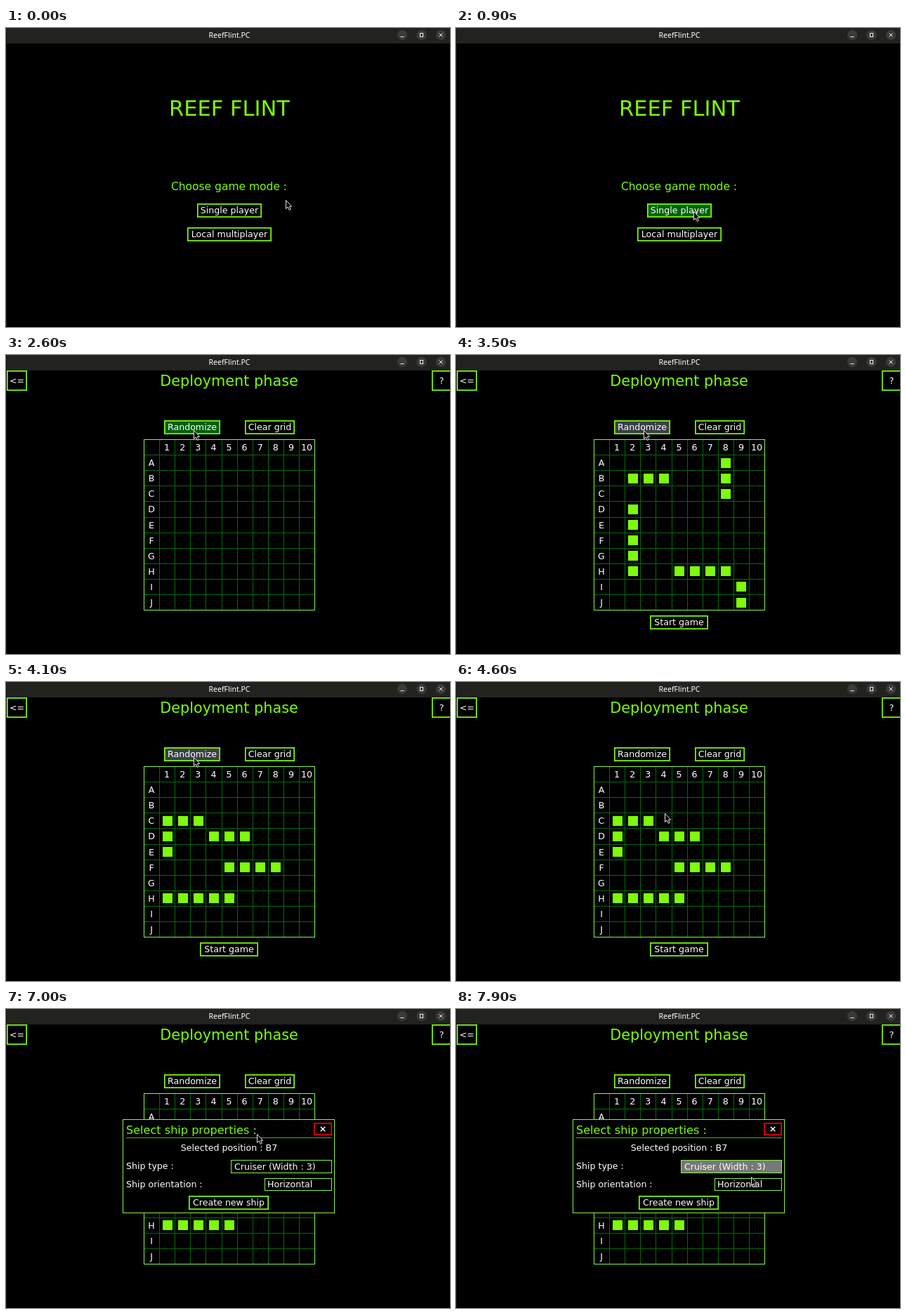
An HTML page with a canvas for the animation above (8 s loop, 632x426 px).

```html
<!DOCTYPE html>
<html lang="en">
<head>
<meta charset="utf-8">
<title>Reef Flint</title>
<style>
  html, body { margin: 0; width: 632px; height: 426px; overflow: hidden; background: #000; }
  canvas { display: block; }
</style>
</head>
<body>
<canvas id="stage" width="632" height="426"></canvas>
<script>
const g = document.getElementById('stage').getContext('2d');
const LOOP = 8000, STEP = 100, MID = 317.5;
const LIME = '#7cfc0a', EDGE = '#86f545', DARK = '#006c08';
const HOVER = '#3b4046', PRESS = '#00610a';
const GRID = { x: 196.5, y: 120.5, cell: 22.1 };

// pointer moves: start, end, x, y
const moves = [
  [0, 100, 372, 242], [300, 500, 339, 261], [1000, 1100, 339, 277], [1300, 1600, 272, 110],
  [2300, 2400, 268, 107], [4200, 4600, 298, 187], [4600, 5000, 381, 203], [5000, 5400, 359, 180],
  [5700, 6100, 342, 224], [6200, 6500, 358, 178], [7400, 7900, 421, 239]
];

// ships: row, column, direction (h or v), length
const fleets = ['A8v3 B2h3 D2v5 H5h4 I9v2', 'C1h3 D1v2 D4h3 F5h4 H1h5'];

function text(s, x, y, { size = 12.6, color = '#fff', align = 'center', font = '"DejaVu Sans", sans-serif', weight = 400 } = {}) {
  g.font = `${weight} ${size}px ${font}`;
  g.textAlign = align;
  g.fillStyle = color;
  g.fillText(s, x, y);
}

function box(x, y, w, h, { line = LIME, width = 1.7, fill = '#000' } = {}) {
  g.fillStyle = fill;
  g.fillRect(x, y, w, h);
  g.strokeStyle = line;
  g.lineWidth = width;
  g.strokeRect(x + width / 2, y + width / 2, w - width, h - width);
}

function button(label, cx, y, w, fill) {
  box(cx - w / 2, y, w, 20, { fill });
  text(label, cx, y + 14);
}

function line(x1, y1, x2, y2, color) {
  g.strokeStyle = color;
  g.lineWidth = 1;
  g.beginPath();
  g.moveTo(x1, y1);
  g.lineTo(x2, y2);
  g.stroke();
}

function windowFrame() {
  g.fillStyle = '#000';
  g.fillRect(0, 0, 632, 426);
  g.fillStyle = '#191919';
  g.fillRect(0, 0, 1, 426);
  g.fillStyle = '#22221f';
  g.fillRect(1, 0, 631, 22);
  text('ReefFlint.PC', 318, 13.5, { size: 10.5, font: '"Noto Sans", sans-serif' });
  for (let i = 0; i < 3; i++) {
    g.fillStyle = '#3a3a37';
    g.beginPath();
    g.arc(564 + i * 27.5, 10, 7.2, 0, 7);
    g.fill();
  }
  line(561.5, 12.5, 566.5, 12.5, '#eee');
  g.strokeRect(589.5, 7.5, 4, 5);
  line(616.5, 7.5, 621.5, 12.5, '#eee');
  line(621.5, 7.5, 616.5, 12.5, '#eee');
}

function menu(t) {
  text('REEF FLINT', 318, 125, { size: 30.5, color: LIME });
  text('Choose game mode :', MID, 231, { size: 15.5, color: LIME });
  button('Single player', 318, 250, 92, t >= 700 ? PRESS : t >= 400 ? HOVER : '#000');
  button('Local multiplayer', 318, 284, 120);
}

function board(fleet) {
  const { x, y, cell } = GRID, size = cell * 11;
  for (let i = 1; i < 11; i++) {
    const d = Math.floor(i * cell + 0.5);
    line(x + d, y, x + d, y + size, DARK);
    line(x, y + d, x + size, y + d, DARK);
    text(i, 207 + i * cell, 136);
    text('ABCDEFGHIJ'[i - 1], 207, 136 + i * cell);
  }
  g.strokeStyle = EDGE;
  g.strokeRect(x, y, 243, 243);
  g.fillStyle = LIME;
  for (const [row, col, dir, length] of fleet ? fleet.split(' ') : []) {
    for (let i = 0; i < length; i++) {
      const c = +col + (dir === 'h' ? i : 0);
      const r = row.charCodeAt(0) - 64 + (dir === 'v' ? i : 0);
      g.fillRect(Math.floor(x + 4.5 + c * cell), Math.floor(y + 4.5 + r * cell), 14, 14);
    }
  }
}

function deployment(t) {
  const within = (a, b) => t >= a && t < b;
  const pressed = within(2600, 2900) || within(3800, 4100);
  const fleet = t < 2900 ? '' : fleets[t < 4100 ? 0 : 1];
  box(1, 22, 29, 29);
  text('<=', 15.5, 41);
  box(606, 22, 29, 29);
  text('?', 620, 41);
  text('Deployment phase', MID, 44, { size: 20.8, color: LIME });
  button('Randomize', 265, 93, 80, pressed ? PRESS : within(1600, 4300) ? HOVER : '#000');
  button('Clear grid', 375.5, 93, 71);
  board(fleet);
  if (t >= 6700) dialog(t);
  else if (fleet) button('Start game', MID, 371, 83);
}

function dialog(t) {
  const left = { align: 'left' }, thin = { line: EDGE, width: 1 };
  box(166, 157, 302, 134, thin);
  text('Select ship properties :', 171, 178, { size: 16.1, color: LIME, align: 'left' });
  line(171, 183.5, 464, 183.5, '#5e9a4c');
  box(438, 162, 26, 18, { line: '#f00008' });
  text('×', 451, 175, { weight: 700 });
  text('Selected position : B7', MID, 202);
  text('Ship type :', 171, 228, left);
  text('Ship orientation :', 171, 254, left);
  box(320, 215, 144, 19, { ...thin, fill: t >= 7700 ? '#787878' : '#000' });
  text('Cruiser (Width : 3)', 325, 229, left);
  box(368, 241, 96, 18, thin);
  text('Horizontal', 372, 254, left);
  button('Create new ship', 317, 266, 114);
}

function pointer(t) {
  let x = 399, y = 245;
  for (const [from, to, nx, ny] of moves) {
    const p = Math.min(1, Math.max(0, (t - from) / (to - from)));
    const ease = p * p * (3 - 2 * p);
    x += (nx - x) * ease;
    y += (ny - y) * ease;
  }
  g.save();
  g.translate(Math.round(x) - 0.5, Math.round(y) + 0.5);
  const arrow = new Path2D('M0 0V12L2.7 9.5L4.8 14L6.8 13L4.8 8.7H8.2Z');
  g.fillStyle = '#000';
  g.fill(arrow);
  g.strokeStyle = '#e8e8e8';
  g.lineWidth = 1;
  g.stroke(arrow);
  g.restore();
}

function draw(now) {
  const t = Math.floor((now % LOOP) / STEP) * STEP;
  windowFrame();
  (t < 1000 ? menu : deployment)(t);
  pointer(t);
}

const start = performance.now();
function tick() {
  draw(performance.now() - start);
  requestAnimationFrame(tick);
}
tick();
</script>
</body>
</html>
```
